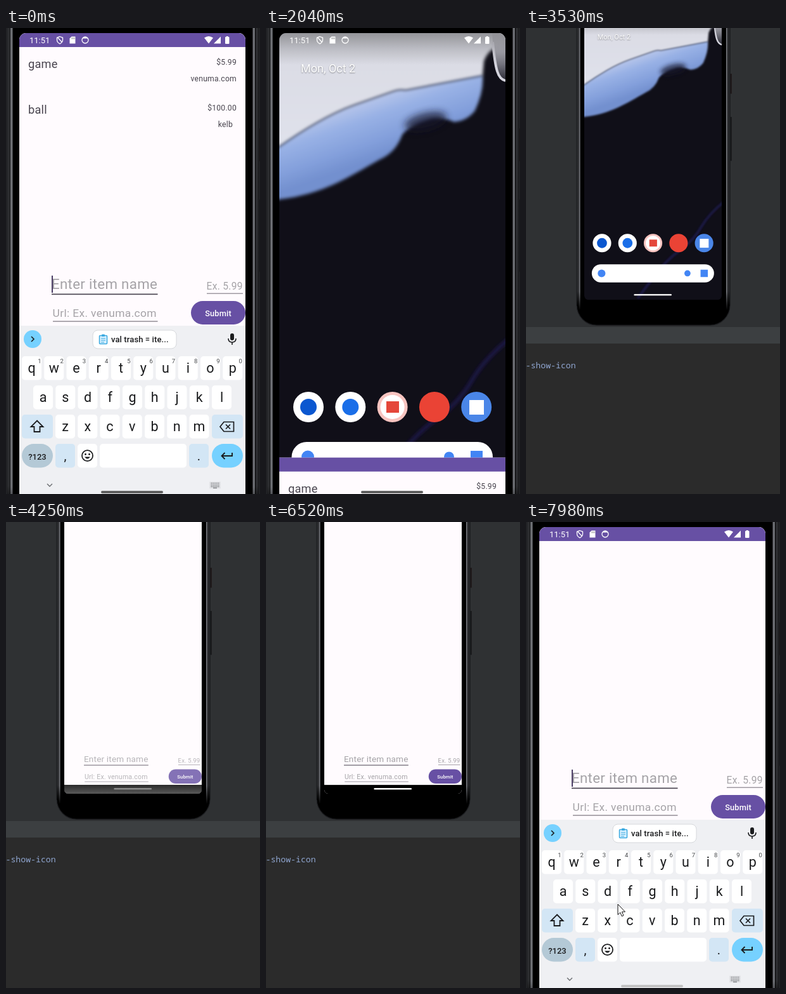
These frames come from a looping animation (401 px wide and 734 px high, 8 s). An HTML page:

```html
<!DOCTYPE html>
<html lang="en">
<head>
<meta charset="utf-8">
<title>Wish list app</title>
<style>
  html, body { margin: 0; width: 100%; height: 100%; overflow: hidden; background: #2f3133; }
  svg { display: block; width: 401px; height: 734px; }
  text { font-family: Roboto, sans-serif; white-space: pre; }
  .mono { font-family: "Noto Sans Mono", monospace; }
</style>
</head>
<body>
<svg id="stage" viewBox="0 0 401 734" xmlns="http://www.w3.org/2000/svg"></svg>
<script>
const LOOP = 8000;
const PAPER = '#fffbfe', PURPLE = '#6750a4', SKY = '#76d1ff', PALE = '#d3e6f5', INK = '#1b1c1e';

// SVG helpers
const rect = (x, y, w, h, r, fill, more = '') =>
  `<rect x="${x}" y="${y}" width="${w}" height="${h}" rx="${r}" fill="${fill}" ${more}/>`;
const disc = (x, y, r, fill, more = '') => `<circle cx="${x}" cy="${y}" r="${r}" fill="${fill}" ${more}/>`;
const fillPath = (d, fill, more = '') => `<path d="${d}" fill="${fill}" ${more}/>`;
const line = (d, color = INK, w = 1.6, more = '') =>
  `<path d="${d}" fill="none" stroke="${color}" stroke-width="${w}" ${more}/>`;
const text = (x, y, size, str, fill = INK, more = '') =>
  `<text x="${x}" y="${y}" font-size="${size}" fill="${fill}" ${more}>${str}</text>`;
const group = (id, body, more = '') => `<g id="${id}" ${more}>${body}</g>`;
const MID = 'text-anchor="middle"', END = 'text-anchor="end"';

function statusIcons() {
  return text(37, 24, 13, '11:51', '#fff')
    + line('M85 13.5l4.5 1.8v3.5q0 4-4.5 6q-4.5-2-4.5-6v-3.5zM82 15.5l6 6.5', '#fff', 1.3)
    + fillPath('M103.5 13.5h6v11h-9v-8z', '#fff')
    + line('M104 15v2.5M106 15v2.5M108 15v2.5', '#777', 0.8)
    + disc(125, 19, 5, 'none', 'stroke="#fff" stroke-width="1.3"')
    + fillPath('M120.5 16.5a5 5 0 0 1 9 0z', '#fff')
    + fillPath('M313 15.5q7-5 14 0l-7 9z', '#fff')
    + fillPath('M339 13.5v11h-11z', '#fff')
    + rect(346, 14, 6.5, 11, 1, '#fff') + rect(347.7, 13, 3, 2, 0, '#fff');
}

function wallpaper() {
  const edge = '187C60 160 100 135 140 121L200 100Q210 96 220 98L342 75';
  return rect(21, 8, 357, 737, 0, '#100f18')
    + line('M390 485Q345 520 325 555T270 615T205 680T160 740', '#1a1947', 6, 'filter="url(#haze)"')
    + fillPath('M0 0V200L21 ' + edge + 'L344 52Q350 36 364 30L400 24V0z', 'url(#cloud)', 'filter="url(#haze)"')
    + fillPath('M0 195L21 ' + edge + 'Q344 100 330 130Q318 146 297 148Q280 140 262 143Q228 152 215 168Q205 196 180 207C130 235 90 262 21 270L0 272z', 'url(#blue)', 'filter="url(#haze)"')
    + '<ellipse cx="252" cy="147" rx="34" ry="13" fill="#15172a" opacity=".75" filter="url(#soft)" transform="rotate(-14 252 147)"/>'
    + fillPath('M357 8Q360 55 365 68T378 83V8z', 'url(#curl)')
    + line('M358 22Q361 55 365 68T378 83', '#d5d5de', 4)
    + rect(21, 8, 357, 50, 0, 'url(#shade)');
}

function homeScreen() {
  const icons = [['#fff', '#0b57d0'], ['#fff', '#1a6ee8'], ['#f8c4c0', '#fff'], ['#ea4335'], ['#4a86e8']];
  return wallpaper()
    + text(55, 70, 18, 'Mon, Oct 2', '#fff', 'style="text-shadow:0 1px 2px #0006"')
    + icons.map(([back, mark], i) => disc(67 + i * 66.3, 597, 24, back)
      + (mark ? disc(67 + i * 66.3, 597, i == 2 ? 19 : 13, mark) : '')).join('')
    + rect(190, 588, 20, 18, 0, '#e5473a') + rect(321, 586, 23, 23, 0, '#fff')
    + rect(40.5, 652, 317.5, 47, 23.5, '#fff')
    + disc(66, 675.5, 10, '#4285f4') + disc(289, 675.5, 8, '#4285f4') + rect(323, 666, 19, 19, 0, '#4285f4');
}

function itemList() {
  const items = [['game', '$5.99', 'venuma.com', 364], ['ball', '$100.00', 'kelb', 358]];
  const dark = '#49454f', wide = ' letter-spacing=".22"';
  return items.map(([name, price, shop, right], i) => {
    const y = i * 72;
    return text(35, 63 + y, 18.2, name, dark, wide)
      + text(364, 57.5 + y, 12.2, price, dark, END + wide)
      + text(right, 84 + y, 12.2, shop, dark, END + wide);
  }).join('');
}

function inputFields() {
  const hint = '#a5a3a7';
  return text(72, 411, 22.3, 'Enter item name', hint, 'letter-spacing=".3"')
    + rect(72, 418.5, 167.5, 1.7, 0, '#4c4653')
    + text(316.5, 412, 15.6, 'Ex. 5.99', hint, 'letter-spacing=".28"')
    + rect(317, 417.6, 57, 1.1, 0, '#7b7680')
    + text(73.5, 455, 17.4, 'Url: Ex. venuma.com', hint, 'letter-spacing=".36"')
    + rect(74, 461.5, 165.5, 1.1, 0, '#6d6873')
    + rect(292, 430, 86, 37, 18.5, PURPLE)
    + text(335, 453.5, 12.8, 'Submit', '#fff', MID + ' font-weight="500" letter-spacing=".15"')
    + rect(72, 390, 2, 27, 0, '#4c3f66', 'id="caret"');
}

function keyboard() {
  const key = (x, y, w, fill = '#fff', r = 5) => rect(x, y, w, 37.5, r, fill);
  const row = (letters, x, y) => [...letters].map((c, i) => {
    const left = x + i * 35.25;
    return key(left, y, 31) + text(left + 15.5, y + 26, 21.5, c, INK, MID);
  }).join('');
  const digits = [...'1234567890'].map((c, i) => text(53 + i * 35.25, 528, 9.5, c, '#44474a', MID)).join('');
  const keysIcon = [0, 1, 2].map(r => line(`M323.5 ${717 + r * 2.7}h13`, '#85878a', 1.6, 'stroke-dasharray="1.8 1"')).join('');
  return rect(21, 469, 357, 276, 0, '#eff0f3')
    + disc(42, 490, 14, SKY) + line('M40 486l4 4l-4 4')
    + rect(137, 476, 132, 29, 8, '#fff', 'stroke="#d6d8dc"')
    + rect(147.5, 484.5, 12, 13, 1, '#d9f1ff', 'stroke="#3aa9e0" stroke-width="1.5"')
    + rect(151, 482.5, 5, 3.5, 1, '#3aa9e0') + line('M150 489h7M150 492h7M150 495h5', '#3aa9e0', 1)
    + text(166, 495, 13, 'val trash = ite...', INK, 'font-weight="500" letter-spacing=".1"')
    + rect(354, 481, 6, 11, 3, INK) + line('M351 489q0 6 6 6t6-6M357 495v4')
    + row('qwertyuiop', 25, 517) + digits
    + row('asdfghjkl', 43, 563) + row('zxcvbnm', 78, 609)
    + key(25, 609, 49, PALE) + line('M49 618.5l9.5 9.5h-5v8h-9v-8h-5z', INK, 1.8)
    + key(325, 609, 49, PALE)
    + line('M344 620.5h15.5v15h-15.5l-6-7.5zM347 624.5l7 7M354 624.5l-7 7', INK, 1.7)
    + key(25, 655, 49, '#b4c9d6', 18.7) + text(49.5, 679.5, 13, '?123', INK, MID + ' font-weight="500"')
    + key(78, 655, 31, PALE) + text(93.5, 681, 20, ',', INK, MID)
    + key(113, 655, 31) + disc(128.5, 673.7, 8.5, 'none', `stroke="${INK}" stroke-width="1.8"`)
    + disc(125.5, 671.5, 1.4, INK) + disc(131.5, 671.5, 1.4, INK) + fillPath('M124 675.5h9q-4.5 6-9 0z', INK)
    + key(148, 655, 137) + key(289, 655, 31, PALE) + text(304.5, 681, 20, '.', INK, MID)
    + key(325, 655, 49, SKY, 18.7) + line('M357 669v5h-16M345.5 669l-5 5l5 5', INK, 1.9)
    + line('M65 718l4 4l4-4', '#6b6d70', 1.4)
    + rect(321, 714.5, 18, 11, 1, '#e2e3e6') + keysIcon + line('M327 724.5h6', '#85878a', 1.3);
}

// Dark metal body with a bright edge down each side
function phoneBody() {
  return rect(400, 158, 4, 52, 1, '#1d1617') + rect(400, 270, 4, 114, 1, '#17181a')
    + rect(1.5, -60, 398, 870, 52, '#000', 'stroke="#1c1d20" stroke-width="2"')
    + rect(2, -10, 4.5, 770, 0, 'url(#side)') + rect(394, -10, 4.5, 770, 0, 'url(#side)')
    + rect(7, -10, 3.5, 780, 0, 'url(#shine)') + rect(389.5, -10, 3.5, 780, 0, 'url(#shine)');
}

const gradient = (id, dir, ...stops) => `<linearGradient id="${id}" ${dir}>`
  + stops.map(([at, color, alpha = 1]) => `<stop offset="${at}" stop-color="${color}" stop-opacity="${alpha}"/>`).join('')
  + '</linearGradient>';
const DOWN = 'x1="0" y1="0" x2="0" y2="1"';
const TILT = 'gradientUnits="userSpaceOnUse" x1="140" y1="121" x2="170" y2="206"';

stage.innerHTML = `<defs>
  ${gradient('cloud', DOWN, [0, '#d9dae2'], [1, '#e0e2ec'])}
  ${gradient('blue', TILT, [0, '#b6c5ea'], [0.3, '#98b1e5'], [0.7, '#84a0dc'], [1, '#7390cf'])}
  ${gradient('curl', DOWN, [0, '#d5d5dc'], [0.4, '#a9a9b2'], [1, '#2a2a35'])}
  ${gradient('shade', DOWN, [0, '#333', 0.42], [0.5, '#333', 0.18], [1, '#333', 0])}
  ${gradient('nav', DOWN, [0, '#2b2b2b'], [1, '#5c5c5c'])}
  ${gradient('side', DOWN, [0, '#2b2c2f'], [0.95, '#2b2c2f'], [1, '#000'])}
  ${gradient('shine', DOWN, [0, '#6c6e73'], [0.94, '#6c6e73'], [1, '#000'])}
  <filter id="soft" x="-50%" y="-100%" width="200%" height="300%"><feGaussianBlur stdDeviation="6"/></filter>
  <filter id="haze"><feGaussianBlur stdDeviation="2.5"/></filter>
  <clipPath id="glass"><rect x="21" y="8" width="357" height="736" rx="11"/></clipPath>
</defs>`
  + rect(0, 0, 401, 734, 0, '#2f3133')
  + group('panel', rect(0, 471, 401, 27, 0, '#3c3f41') + rect(0, 497, 401, 237, 0, '#2b2b2b')
    + text(-0.5, 536, 13.2, '-show-icon', '#8fa5cf', 'class="mono"'))
  + group('phone', phoneBody()
    + group('screen',
      group('home', homeScreen())
      + group('app',
        rect(21, 8, 357, 737, 0, PAPER) + group('list', itemList()) + group('fields', inputFields())
        + rect(21, 8, 357, 737, 0, PAPER, 'id="splash"') + disc(199.5, 375.5, 72, '#3ddc84', 'id="launcher"')
        + rect(21, 8, 357, 22, 0, PURPLE)
        + rect(21, 721, 357, 24, 0, '#000') + rect(21, 721, 357, 24, 0, 'url(#nav)', 'id="navFade"')
        + group('keys', keyboard()))
      + statusIcons() + rect(150, 729, 98, 4, 2, '#fff', 'id="pill"'), 'clip-path="url(#glass)"'))
  + group('mouse', fillPath('M0 0V16.5L3.8 13L6.3 19L9 17.8L6.5 12H11.5z', '#fff', 'stroke="#111"'));

const $ = id => document.getElementById(id);
const set = (id, name, value) => $(id).setAttribute(name, value);
const show = (id, on) => set(id, 'visibility', on ? 'inherit' : 'hidden');
const clamp = p => Math.min(1, Math.max(0, p));
const part = (t, from, to) => clamp((t - from) / (to - from));
const easeOut = p => 1 - (1 - p) ** 3;

// Linear interpolation through points of [time, value, value, ...]
function track(points, t) {
  const next = points.findIndex(p => p[0] > t);
  if (next < 1) return points.at(next).slice(1);
  const a = points[next - 1], b = points[next], p = part(t, a[0], b[0]);
  return a.slice(1).map((v, i) => v + (b[i + 1] - v) * p);
}

const PILL = [[0, 96], [2370, 96], [3130, 240], [3800, 240], [4000, 130], [4250, 140], [4720, 255], [7780, 255], [7980, 195]];
const TRIPS = [
  [[320, 300, 734], [520, 352, 420], [780, 402, 11]],
  [[4990, 352, 183], [5120, 318, 262], [5260, 290, 348], [5460, 304, 350], [5700, 262, 400], [5900, 215, 390],
    [6120, 184, 374], [6320, 187, 375], [6460, 358, 462], [6520, 401, 476]],
  [[7060, 401, 500], [7350, 190, 645], [7500, 180, 650], [7780, 158, 622], [7940, 145, 602], [LOOP, 145, 602]]
];

function draw(t) {
  const small = t >= 3460 && t < 6990, relaunched = t >= 3460;
  show('panel', small);
  set('phone', 'transform', small ? 'translate(79.24 -24.1) scale(.6078)' : '');

  // The app slides away, then comes back through its splash screen
  const drop = relaunched ? 0 : 736 * easeOut(part(t, 1640, 2370));
  set('app', 'transform', `translate(0 ${drop})`);
  set('app', 'opacity', relaunched ? part(t, 3560, 3840) : 1);
  set('splash', 'opacity', relaunched ? 1 - part(t, 4060, 4297) : 0);
  set('launcher', 'opacity', relaunched ? 1 - part(t, 4060, 4200) : 0);
  set('navFade', 'opacity', relaunched ? 1 - part(t, 4250, 4520) : 0);
  show('list', !relaunched);

  const raised = relaunched ? easeOut(part(t, 7430, 7780)) : 1;
  set('fields', 'transform', `translate(0 ${250.5 * (1 - raised)})`);
  set('keys', 'transform', `translate(0 ${276 * (1 - raised)})`);
  show('keys', raised > 0);
  show('caret', t < 480 || t >= 980 && t < 1440 || t >= 7400);

  const gray = Math.round(track(PILL, t)[0]);
  set('pill', 'fill', `rgb(${gray},${gray},${gray})`);

  const trip = TRIPS.find(p => t >= p[0][0] && t < p.at(-1)[0]);
  show('mouse', trip);
  if (trip) set('mouse', 'transform', `translate(${track(trip, t)})`);
}

const start = performance.now();
function tick() {
  draw((performance.now() - start) % LOOP);
  requestAnimationFrame(tick);
}
tick();
</script>
</body>
</html>
```
